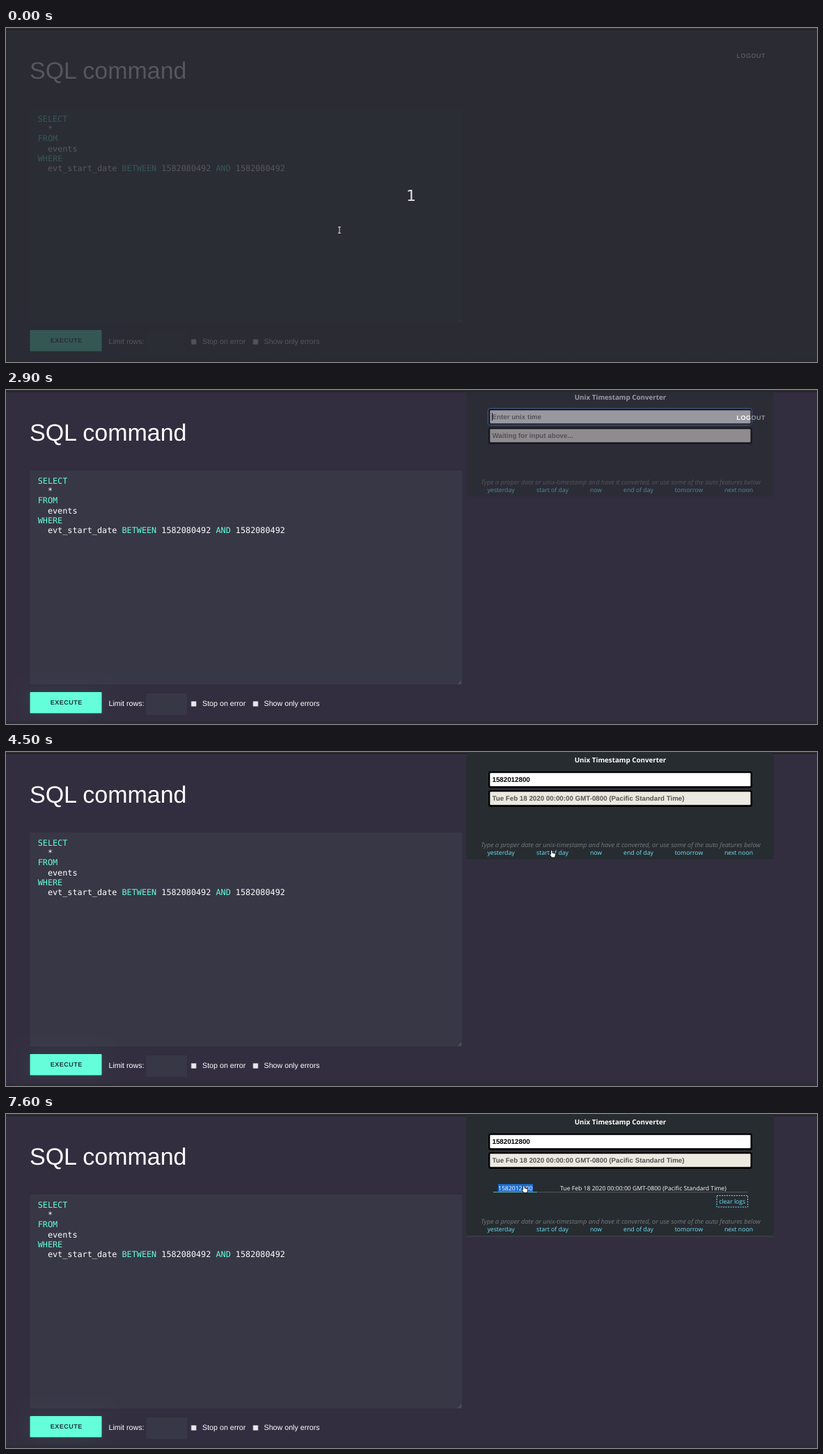
Animation, 1165 px wide and 481 px high, one loop 8 s. Source, as an HTML page with a canvas:

```html
<!DOCTYPE html>
<html lang="en">
<head>
<meta charset="utf-8">
<title>Timestamp popup</title>
<style>
  html, body { margin: 0; width: 100%; height: 100%; overflow: hidden; background: #322e3f; }
  canvas { display: block; width: 1165px; height: 481px; }
</style>
</head>
<body>
<canvas id="stage" width="1165" height="481"></canvas>
<script>
const W = 1165, H = 481, LOOP = 8000;
const stage = document.getElementById('stage').getContext('2d');
const layer = Object.assign(document.createElement('canvas'), { width: W, height: H }).getContext('2d');
let g = stage;

const ARIAL = '"Liberation Sans", Arial, sans-serif';
const MONO = '"DejaVu Sans Mono", monospace';
const HUMAN = '"Open Sans", "Noto Sans", sans-serif';
const TEAL = '#64ffda', LINK = '#6fe3fa', WHITE = '#fff';
const STAMP = '1582012800';
const DATE = 'Tue Feb 18 2020 00:00:00 GMT-0800 (Pacific Standard Time)';

const QUERY = [
  [0, 0, 'SELECT', TEAL],
  [1, 2, '*', WHITE],
  [2, 0, 'FROM', TEAL],
  [3, 2, 'events', WHITE],
  [4, 0, 'WHERE', TEAL],
  [5, 2, 'evt_start_date', WHITE],
  [5, 17, 'BETWEEN', TEAL],
  [5, 25, '1582080492', WHITE],
  [5, 36, 'AND', TEAL],
  [5, 40, '1582080492', WHITE]
];

const LINKS = [
  ['yesterday', 711], ['start of day', 785], ['now', 847.5],
  ['end of day', 908.5], ['tomorrow', 981], ['next noon', 1052.5]
];

// Pointer stops: time, x, y, shape; each holds until the next.
const POINTER = [
  [0, 479, 291, 'beam'],
  [1500, 447, 322, 'beam'],
  [1600, 426, 342, 'beam'],
  [1800, 429, 385, 'beam'],
  [1900, 430.5, 416.5, 'beam'],
  [2100, 0, 0, ''],
  [3300, 594, 240, 'beam'],
  [3400, 642, 212, 'beam'],
  [3500, 738, 178, 'arrow'],
  [3600, 826, 150, 'arrow'],
  [3700, 868, 134, 'beam'],
  [3800, 842, 129, 'beam'],
  [3900, 803, 132, 'beam'],
  [4000, 783, 137, 'beam'],
  [4100, 784, 146, 'hand'],
  [4300, 785, 147, 'hand'],
  [4600, 783, 146, 'hand'],
  [4800, 782, 137, 'beam'],
  [4900, 780, 113, 'beam'],
  [5000, 777, 84, 'beam'],
  [5100, 774, 60, 'beam'],
  [5200, 772, 46, 'beam'],
  [5300, 771, 41, 'beam'],
  [6900, 769, 47, 'beam'],
  [7000, 763, 66, 'arrow'],
  [7100, 754, 90, 'arrow'],
  [7200, 747, 105, 'hand'],
  [7300, 745, 108.5, 'hand']
];

const within = (t, a, b) => t >= a && t < b;

function box(x, y, w, h, color, r = 0) {
  g.fillStyle = color;
  g.beginPath();
  g.roundRect(x, y, w, h, r);
  g.fill();
}

function text(str, x, y, font, color, align = 'left', spacing = 0) {
  g.font = font;
  g.fillStyle = color;
  g.textAlign = align;
  g.textRendering = 'geometricPrecision';
  g.letterSpacing = spacing + 'px';
  g.fillText(str, x, y);
}

function outline(points, x, y) {
  g.beginPath();
  points.forEach(([dx, dy], i) => g[i ? 'lineTo' : 'moveTo'](x + dx, y + dy));
  g.closePath();
  g.lineJoin = 'round';
  g.lineWidth = 1.6;
  g.strokeStyle = '#111';
  g.stroke();
  g.fillStyle = WHITE;
  g.fill();
}

function checkbox(x) {
  box(x, 448, 8, 8, '#8d8d92', 1);
  box(x + .8, 448.8, 6.4, 6.4, '#e9e9ec', .6);
}

function page() {
  box(0, 0, W, H, '#322e3f');
  const foot = g.createLinearGradient(0, 475, 0, H);
  foot.addColorStop(0, 'rgba(0,0,0,0)');
  foot.addColorStop(1, 'rgba(0,0,0,.12)');
  box(0, 475, W, 6, foot);

  text('SQL command', 34, 73, '34px ' + ARIAL, WHITE);
  text('LOGOUT', 1049.5, 43, 'bold 9px ' + ARIAL, WHITE, 'left', .5);

  box(34.5, 116, 620.5, 308, '#383746', 1);
  for (const [row, col, str, color] of QUERY)
    text(str, 45.7 + col * 7.104, 135.2 + row * 14.1, '11.8px ' + MONO, color);
  g.strokeStyle = '#85848e';
  g.lineWidth = .7;
  g.beginPath();
  g.moveTo(649.5, 423.5); g.lineTo(654, 419);
  g.moveTo(652, 423.5); g.lineTo(654, 421.5);
  g.stroke();

  g.save();
  g.shadowColor = 'rgba(100,255,218,.08)';
  g.shadowBlur = 24;
  box(34.5, 435, 103, 30.5, TEAL, 1);
  g.restore();
  text('EXECUTE', 63.7, 453, 'bold 9px ' + ARIAL, '#24343f', 'left', .5);

  const label = '10.7px ' + ARIAL;
  text('Limit rows:', 147.5, 455, label, WHITE);
  box(201.5, 437, 58.5, 31, '#383746', 1);
  checkbox(265.7);
  text('Stop on error', 282, 455, label, WHITE);
  checkbox(354.5);
  text('Show only errors', 370.5, 455, label, WHITE);
}

function topBar() {
  box(0, 0, W, 2, '#2d2d2d');
  box(0, 2, W, 1, '#1d1c1f');
}

function field(y, fill, str, color) {
  box(693, y, 379, 24, '#000', 3);
  box(695.3, y + 2.3, 374.2, 19, fill, 1);
  text(str, 698.5, y + 15, 'bold 9.75px ' + ARIAL, color);
}

function logRow(t) {
  const font = '8.65px ' + HUMAN;
  box(700, 112, 63, 1, t >= 7200 ? '#4fb5c6' : '#53575a');
  box(764, 112, 301, 1, '#53575a');
  if (t >= 7600) box(707, 101, 50, 11, '#1b6fd3');
  text(STAMP, 707, 109.7, font, WHITE);
  text(DATE, 796, 109.7, font, WHITE);
  g.strokeStyle = LINK;
  g.lineWidth = 1;
  g.setLineDash([2, 1.5]);
  g.strokeRect(1021, 117.5, 44.5, 16.5);
  g.setLineDash([]);
  text('clear logs', 1043.2, 129, font, LINK, 'center');
}

function popup(t) {
  const filled = t >= 4500, logged = t >= 6500;
  const shift = logged ? 21 : 0;
  box(661, 0, 442, 155 + shift, '#272c31');
  box(661, 154.5 + shift, 442, 1, logged ? '#46494d' : '#2f3238');

  text('Unix Timestamp Converter', 882.5, 14.6, 'bold 9.8px ' + HUMAN, WHITE, 'center');
  field(28, WHITE, filled ? STAMP : 'Enter unix time', filled ? '#000' : '#757575');
  field(55, '#ebe9e0', filled ? DATE : 'Waiting for input above...', filled ? '#545454' : '#757575');

  if (t < 4500 || within(t, 5500, 7500)) {
    g.strokeStyle = '#5b93cf';
    g.lineWidth = 1;
    g.beginPath();
    g.roundRect(692.5, 27.5, 379, 24, 3);
    g.stroke();
  }
  if (within(t, 2900, 3400) || within(t, 3900, 4500)) box(698, 34, 1, 11, '#000');
  if (within(t, 5500, 6000) || within(t, 6600, 7100)) box(752, 34, 1, 11, '#000');

  if (logged) logRow(t);
  text('Type a proper date or unix-timestamp and have it converted, or use some of the auto features below',
    883, 136.7 + shift, 'italic 9.15px ' + HUMAN, '#777a7c', 'center');
  for (const [name, x] of LINKS)
    text(name, x, 147.6 + shift, '8.7px ' + HUMAN, LINK, 'center');
}

function drawPopup(t) {
  g = layer;
  g.clearRect(0, 0, W, H);
  popup(t);
  g = stage;
  const step = Math.min(2, Math.floor((t - 2900) / 100));
  g.globalAlpha = [.5, .88, 1][step];
  g.drawImage(layer.canvas, 0, [-1, 0, 0][step]);
  g.globalAlpha = 1;
}

function beam(x, y) {
  const strokes = [[2.4, '#222'], [1, '#eee']];
  for (const [width, color] of strokes) {
    g.lineWidth = width;
    g.strokeStyle = color;
    g.beginPath();
    g.moveTo(x - 2, y - 4.3); g.lineTo(x + 2, y - 4.3);
    g.moveTo(x, y - 4.3); g.lineTo(x, y + 4.3);
    g.moveTo(x - 2, y + 4.3); g.lineTo(x + 2, y + 4.3);
    g.stroke();
  }
}

const SHAPES = {
  beam,
  arrow: (x, y) => outline([[-3, -5], [-3, 4], [-1, 2.2], [.5, 5], [1.8, 4.4], [.6, 1.8], [3.2, 1.6]], x, y),
  hand: (x, y) => outline([[-2, -5], [-.6, -5], [-.4, -1.6], [3.6, -.6], [4, .6], [3.2, 4.6],
    [-1, 4.6], [-3.4, 1], [-2.6, .2], [-2, .8]], x, y)
};

function draw(t) {
  page();
  if (t < 400) {
    box(0, 2, W, H, 'rgba(40,43,49,.79)');
    text('1', 582, 248.5, '22px "DejaVu Sans", sans-serif', '#e2e2e4', 'center');
  }
  topBar();
  if (t >= 2900) drawPopup(t);
  const [, x, y, shape] = POINTER.findLast(p => p[0] <= t);
  if (shape) SHAPES[shape](x, y);
}

const start = performance.now();
function tick() {
  draw((performance.now() - start) % LOOP);
  requestAnimationFrame(tick);
}
tick();
</script>
</body>
</html>
```
